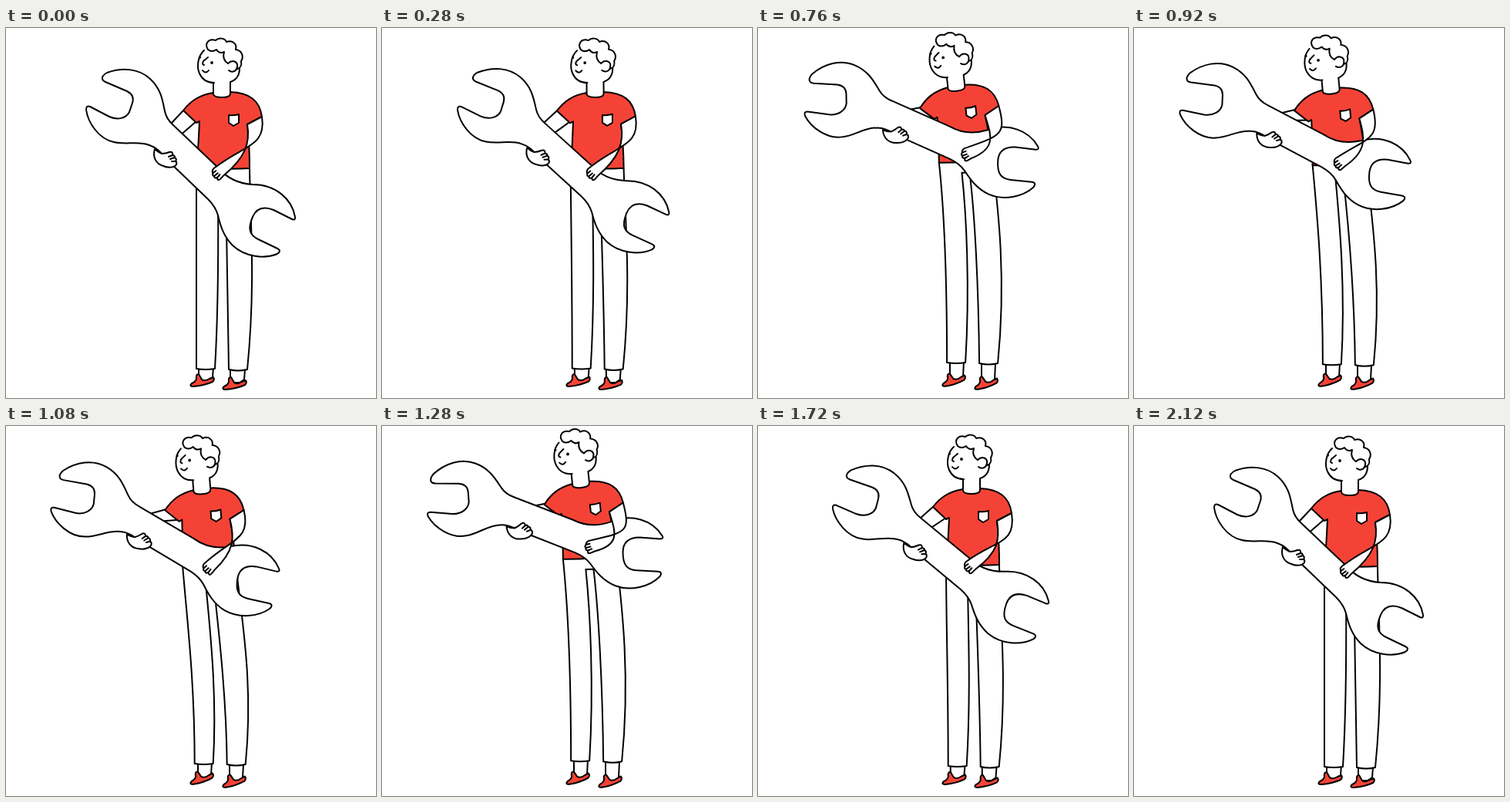
Recreate the animation shown at these times as an HTML page. Size 480x480 px, loop 2200 ms.

```html
<!DOCTYPE html>
<html lang="en">
<head>
<meta charset="utf-8">
<title>Mechanic with a wrench</title>
<style>
  html, body { margin: 0; width: 100%; height: 100%; overflow: hidden; background: #fff; }
  svg { display: block; width: 100vw; height: 100vh; }
  .ink { fill: #fff; stroke: #000; stroke-width: 2; stroke-linejoin: round; stroke-linecap: round; }
  .line { fill: none; }
  .red { fill: #f44336; }
  .dot { fill: #000; stroke: none; }
</style>
</head>
<body>
<svg viewBox="0 0 480 480">
  <defs>
    <path id="shoe" class="red" d="M241 461Q237 465 243 465Q257 464 268 459Q271 456 269 453L264 455Q258 459 254 456L250 449Q246 449 247 455Q246 459 241 461Z"/>
  </defs>
  <g class="ink">
    <path id="ankles"/>
    <g id="shoeL"><use href="#shoe"/></g>
    <g id="shoeR"><use href="#shoe" x="42" y="4"/></g>
    <path id="pants"/>
    <path id="backArm"/>
    <g id="body">
      <path class="red" d="M269 84C251 87 240 94 230 107L247 123L251 121Q250 150 247 180Q282 184 316 182Q316 150 313 125L332 115C329 94 316 84 291 83Z"/>
      <path d="M289 113Q295 114 302 112L302 123L295 127L289 123Z"/>
      <path d="M269 66V86Q270 90 280 90Q291 90 291 85V55Z"/>
      <path stroke="none" d="M258 28C250 36 247 48 251 58C255 68 262 71 270 71L291 70Q303 66 303 52L300 26Z"/>
      <path class="line" d="M257 29C249 36 247 50 251 59C255 68 262 71 270 71M291 70Q303 66 303 52"/>
      <path d="M262 28C257 20 263 13 272 16C276 12 284 13 286 18C294 15 300 21 298 28C306 29 309 37 305 43C306 48 304 52 300 53L288 46Q280 41 283 31Q277 34 273 28Q267 32 262 28Z"/>
      <path d="M288 46C294 40 301 44 300 50C299 57 293 58 289 55"/>
      <path class="line" d="M262 38L256 43M257 42Q253 47 257 48M255 55Q259 60 263 55"/>
      <g id="open" class="dot"><circle cx="267" cy="45" r="1.9"/><circle cx="251.5" cy="38" r="1.6"/></g>
      <path id="shut" class="line" d="M264 45Q267 48 271 45M250 38L253 40"/>
    </g>
    <g id="wrench">
      <path d="M125 66Q124 62 131 58C150 51 172 52 187 66C201 79 203 93 206 108Q208 118 217 126L276 182C288 196 302 202 320 203C350 203 371 222 375 245Q376 250 371 248L347 236C332 230 324 236 320 245C317 252 315 258 317 264Q319 270 327 274L352 286Q358 289 352 293C335 300 310 297 294 282C282 270 278 256 275 243Q272 232 262 222L212 174C202 163 196 155 186 152C172 146 156 152 140 148C120 144 106 122 104 106Q104 100 109 102L134 115C145 120 156 117 160 109L164 97Q167 87 157 82L129 70Q125 68 125 66Z"/>
      <path d="M193 157C190 167 194 176 204 179C211 182 219 181 221 177Q222 174 220 173Q222 170 219 168Q219 165 216 165Q217 160 212 161Q207 163 202 163Q197 161 193 157Z"/>
      <path class="line" d="M216 165L211 167M219 168L213 170M220 173L215 173"/>
    </g>
    <path id="arm"/>
    <path id="fingers" class="line" d="M3 -4L-2 -3M5 0L-1 0M4 4L-1 4"/>
  </g>
</svg>
<script>
const LOOP = 2200, STEP = 40;
// time, wrench angle/x/y, body x/y/tilt, hand x/y/angle, cuff lift
const KEYS = [
  [200, 36.5, 240, 176.5, 0, 0, 0, 274, 189, 142, 0],
  [480, 26.3, 211.3, 154.7, -20, -2, -4, 262, 188, 136, -4],
  [600, 20.5, 207, 142.5, -22.5, -6, -5.5, 264, 177, 146, -6.5],
  [760, 16.8, 212.8, 134.5, -19, -10, -6.2, 270, 164, 160, -8],
  [1080, 23.4, 207, 148.7, -23, -3, -4.6, 262, 185, 138, -4],
  [1330, 12.3, 214.5, 127, -17, -13.5, -6, 272, 151, 174, -8.5],
  [1440, 16.2, 222, 134.5, -12, -11, -4.6, 279, 157, 176, -7.5],
  [1720, 32.5, 237.5, 168, -3, -2, 0, 274, 183, 145, -1]
];
KEYS.push([1880, ...KEYS[0].slice(1)]);

const $ = id => document.getElementById(id);
const set = (id, name, value) => $(id).setAttribute(name, value);
const pt = p => p[0].toFixed(2) + ' ' + p[1].toFixed(2);
const add = (p, x, y) => [p[0] + x, p[1] + y];
const path = parts => parts.map(p => typeof p === 'string' ? p : pt(p)).join(' ');

function turn(x, y, deg) {
  const a = deg * Math.PI / 180, c = Math.cos(a), s = Math.sin(a);
  return [x * c - y * s, x * s + y * c];
}

function slope(i, col) {
  if (i === 0 || i === KEYS.length - 1) return 0;
  const a = KEYS[i - 1], b = KEYS[i + 1];
  return (b[col] - a[col]) / (b[0] - a[0]);
}

// Smooth curve through the poses, at rest at both ends
function poseAt(t) {
  const last = KEYS.length - 1;
  if (t <= KEYS[0][0] || t >= KEYS[last][0]) return KEYS[0].slice(1);
  let i = 0;
  while (t > KEYS[i + 1][0]) i++;
  const a = KEYS[i], b = KEYS[i + 1], d = b[0] - a[0], u = (t - a[0]) / d, v = 1 - u;
  return a.slice(1).map((from, k) => {
    const col = k + 1;
    return from * v * v * (1 + 2 * u) + b[col] * u * u * (1 + 2 * v)
      + d * u * v * (slope(i, col) * v - slope(i + 1, col) * u);
  });
}

function draw(t) {
  const [angle, wx, wy, bx, by, tilt, hx, hy, hand, lift] = poseAt(t);
  const onBody = (x, y) => add(turn(x - 295, y - 119, tilt), 295 + bx, 119 + by);
  const onWrench = (x, y) => add(turn(x - 240, y - 176.5, angle - 36.5), wx, wy);
  const onHand = (x, y) => add(turn(x, -y, hand), hx, hy);

  set('body', 'transform', `translate(${bx} ${by}) rotate(${tilt} 295 119)`);
  set('wrench', 'transform', `translate(${wx} ${wy}) rotate(${angle - 36.5}) translate(-240 -176.5)`);

  // Legs hang from the hips, with the cuffs moving a little
  const cuff = (x, y) => [x + bx * 0.1, y + lift];
  const outL = cuff(247, 442), inL = cuff(271, 442), inR = cuff(289, 443), outR = cuff(313, 443);
  set('pants', 'd', path([
    'M', onBody(247, 179),
    'C', onBody(247, 250), add(outL, 0, -110), outL,
    'Q', add(outL, 12, 2), inL,
    'C', add(inL, 6, -100), onBody(275, 250), onBody(275, 196),
    'L', onBody(285, 197),
    'C', onBody(286, 250), add(inR, -1, -100), inR,
    'Q', add(inR, 12, 3), outR,
    'C', add(outR, 11, -110), onBody(317, 250), onBody(316, 182), 'Z'
  ]));

  const raised = Math.min(1, -lift / 4);
  const ankle = (x, y) => path([
    'M', [x + 250 - raised, y + 440 + lift], 'L', [x + 250 - raised, y + 451],
    'L', [x + 254, y + 457], 'L', [x + 262, y + 457], 'L', [x + 268 - 2 * raised, y + 453],
    'L', [x + 269 - 2 * raised, y + 440 + lift]
  ]);
  set('ankles', 'd', ankle(0, 0) + ankle(41, 3));
  set('shoeL', 'transform', `rotate(${-5 * raised} 240 464)`);
  set('shoeR', 'transform', `rotate(${-5 * raised} 282 468)`);

  set('backArm', 'd', path([
    'M', onBody(231, 106), 'L', onWrench(200, 139),
    'L', onWrench(217, 147), 'L', onBody(247, 121)
  ]));

  // Front arm runs from the sleeve to the gripping hand
  set('arm', 'd', path([
    'M', onBody(332, 115),
    'C', onBody(338, 154), onHand(-50, -8), onHand(-4, -8),
    'Q', onHand(3, -9), onHand(4, -4),
    'Q', onHand(7, -2), onHand(5, 0),
    'Q', onHand(7, 3), onHand(3, 4),
    'Q', onHand(6, 8), onHand(1, 8),
    'L', onHand(-5, 7),
    'C', onHand(-42, 6), onBody(317, 149), onBody(313, 125), 'Z'
  ]));
  set('fingers', 'transform', `translate(${hx} ${hy}) rotate(${hand})`);

  const blink = t >= 2000 && t < 2120;
  set('open', 'visibility', blink ? 'hidden' : 'visible');
  set('shut', 'visibility', blink ? 'visible' : 'hidden');
}

const start = performance.now();
function tick() {
  const t = (performance.now() - start) % LOOP;
  draw(Math.floor(t / STEP) * STEP);
  requestAnimationFrame(tick);
}
tick();
</script>
</body>
</html>
```
